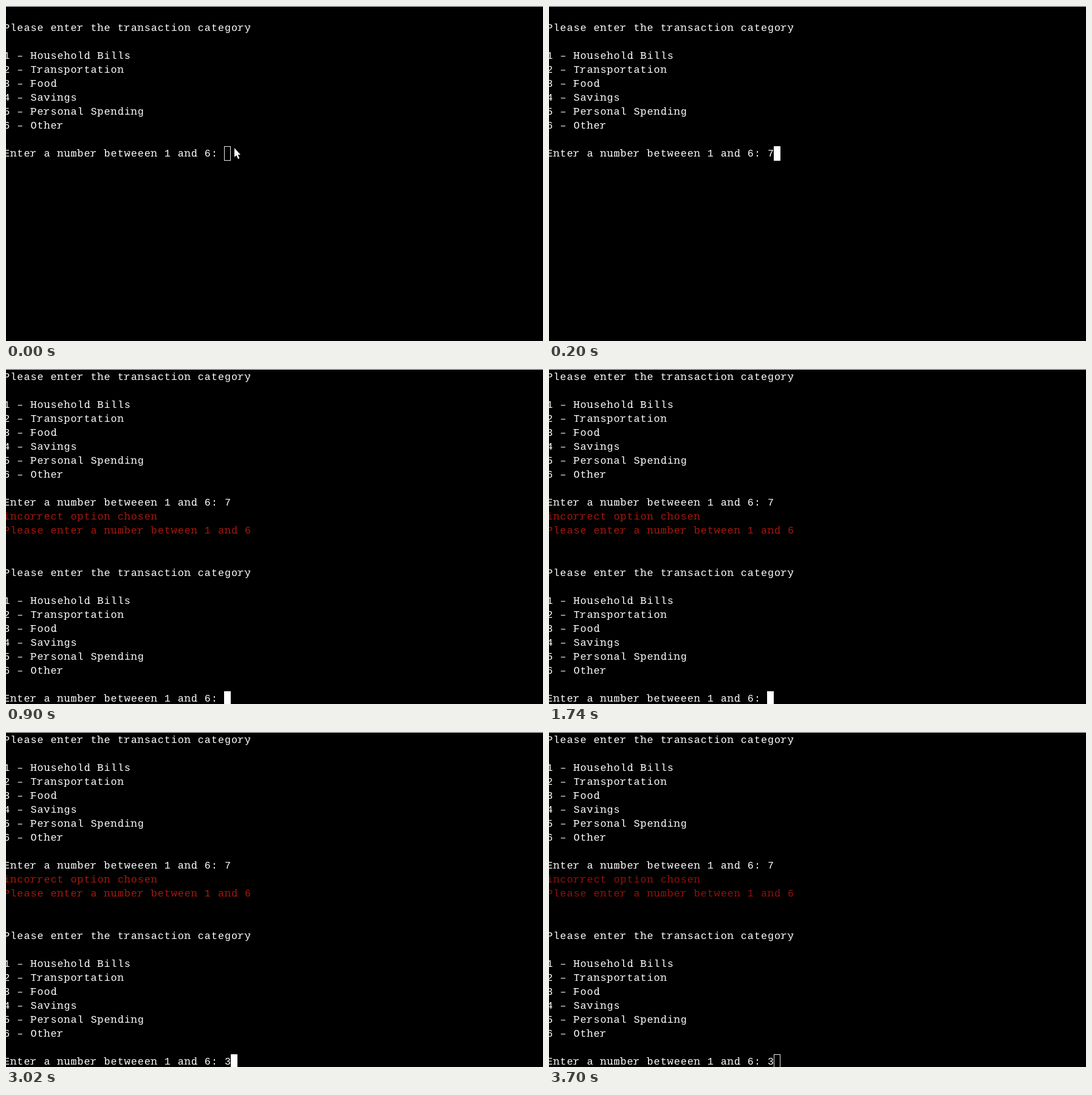
Write an HTML page with a canvas that moves like this. It is 884 px wide and 552 px high and loops after 3.9 s.

```html
<!DOCTYPE html>
<html lang="en">
<head>
<meta charset="utf-8">
<title>Transaction category prompt</title>
<style>
  html, body { margin: 0; height: 100%; overflow: hidden; background: #000; }
  canvas { display: block; }
</style>
</head>
<body>
<canvas id="stage" width="884" height="552"></canvas>
<script>
const ctx = document.getElementById("stage").getContext("2d", { alpha: false });
const LOOP = 3900;
const LEFT = -4.2, CELL = 11.02, ROW = 23.07, FONT_SIZE = 16.6;
const GAP = CELL - FONT_SIZE * 0.6;
const WHITE = "#fff", SOFT_WHITE = "#e6e6e6";

const MENU = [
  "Please enter the transaction category", "",
  "1 – Household Bills", "2 – Transportation", "3 – Food",
  "4 – Savings", "5 – Personal Spending", "6 – Other", ""
];
const PROMPT = "Enter a number betweeen 1 and 6: ";
const ERRORS = ["incorrect option chosen", "Please enter a number between 1 and 6"];

// Slab serifs: level (base, x-height, cap, ascender, descender) + stem side.
const SERIFS = {
  n: "bL bR xL", m: "bL bC bR", h: "bL bR aL", r: "bL xL", p: "dL xL",
  b: "aL", d: "bR aR", u: "bR xL xR", f: "bC", y: "xL xR", w: "xL xR",
  v: "xL xR", H: "bL bR cL cR", P: "bL cL", F: "bL cL", T: "bC",
  E: "bL cL", B: "bL cL"
};
const LEVEL = { b: -1, x: -9, c: -11, a: -12, d: 2 };
const STEM = { L: 2.4, C: 5.5, R: 8.5 };

const columnX = col => LEFT + col * CELL;
const baseline = row => Math.floor(18.05 + ROW * row);

function drawSerifs(char, x, y) {
  for (const [level, side] of (SERIFS[char] || "").split(" ").filter(Boolean)) {
    const stub = level === "x" || level === "a";
    const width = stub ? 2.4 : char === "m" ? 2.6 : 4;
    const left = STEM[side] - (stub ? width : width / 2);
    ctx.fillRect(x + left, y + LEVEL[level], width, 1);
  }
}

function drawLine(text, row, color = WHITE) {
  const y = baseline(row);
  ctx.fillStyle = color;
  ctx.fillText(text, LEFT + GAP / 2, y);
  [...text].forEach((char, col) => drawSerifs(char, columnX(col), y));
}

function drawPrompt(row, typed) {
  MENU.forEach((text, i) => drawLine(text, row + i));
  drawLine(PROMPT + typed, row + MENU.length);
}

function drawCursor(row, typed, focused) {
  const x = Math.floor(columnX(PROMPT.length + typed.length));
  const y = baseline(row + MENU.length) - 17;
  ctx.fillStyle = WHITE;
  ctx.strokeStyle = SOFT_WHITE;
  if (focused) ctx.fillRect(x, y, 11, 24);
  else ctx.strokeRect(x + 0.5, y + 0.5, 10, 23);
}

function drawPointer(x, y) {
  const outline = [[0, 0], [0, 15], [3.4, 12], [6, 18], [8.4, 17], [5.8, 11], [10, 11]];
  ctx.beginPath();
  outline.forEach(([dx, dy]) => ctx.lineTo(x + dx, y + dy));
  ctx.closePath();
  ctx.fillStyle = WHITE;
  ctx.fill();
}

function draw(time) {
  ctx.fillStyle = "#000";
  ctx.fillRect(0, 0, 884, 552);
  ctx.font = `${FONT_SIZE}px "Liberation Mono", monospace`;
  ctx.letterSpacing = GAP + "px";
  ctx.textRendering = "geometricPrecision";
  ctx.lineWidth = 1;

  if (time < 900) {
    const typed = time < 200 ? "" : "7";
    drawPrompt(1, typed);
    drawCursor(1, typed, time >= 100);
    if (time < 100) drawPointer(376, 234);
  } else {
    const typed = time < 2300 ? "" : "3";
    const red = time < 3700 ? "#a8180c" : "#98100a";
    drawPrompt(0, "7");
    ERRORS.forEach((text, i) => drawLine(text, 10 + i, red));
    drawPrompt(14, typed);
    drawCursor(14, typed, time < 3500);
  }
  ctx.fillStyle = SOFT_WHITE;
  ctx.fillRect(0, 0, 884, 1);
}

const start = performance.now();
function tick() {
  draw((performance.now() - start) % LOOP);
  requestAnimationFrame(tick);
}
tick();
</script>
</body>
</html>
```
